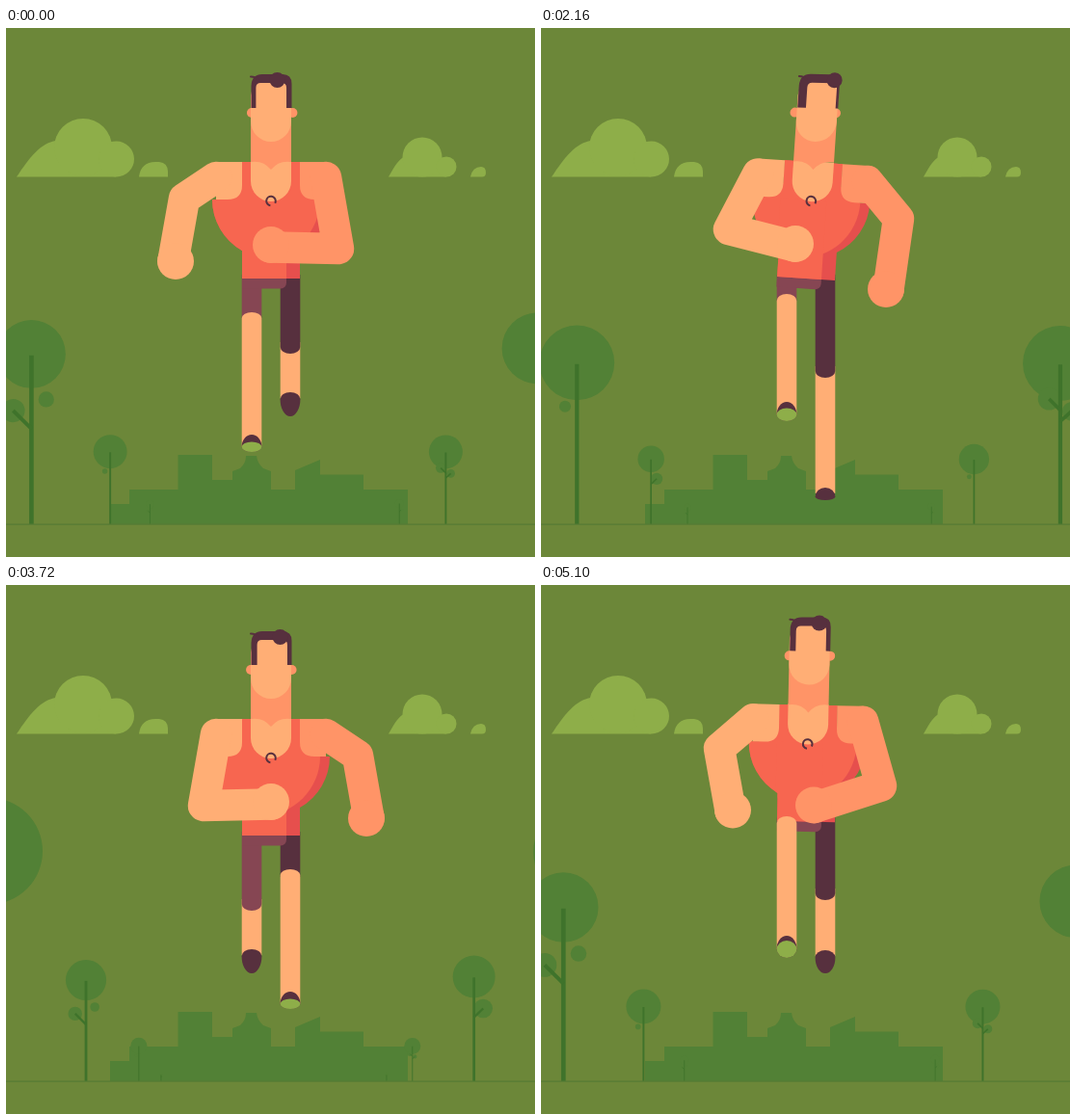
These frames come from a looping animation (549x549 px, 5.13 s). An HTML page with a canvas:

```html
<!DOCTYPE html>
<html lang="en">
<head>
<meta charset="utf-8">
<title>Runner</title>
<style>
html, body { margin: 0; width: 100%; height: 100%; overflow: hidden; background: #6c8739; }
canvas { display: block; width: 100vw; height: 100vh; }
</style>
</head>
<body>
<canvas id="stage" width="549" height="549"></canvas>
<script>
const c = document.getElementById('stage').getContext('2d');
const TAU = Math.PI * 2;
const STEP = 30, STEPS = 171, STRIDE = 19, CYCLE = 20;
const GROUND = 515, MID = 275;

const SKY = '#6c8739', CLOUD = '#8eae49', LEAF = '#528136', TRUNK = '#3f732b';
const SKIN = '#ffae75', TAN = '#ff9467', SHIRT = '#f76650', SHADE = '#e64f4d';
const PLUM = '#864653', DARK = '#57303e';

// Key poses of the right side; the left side is half a cycle later.
const KEYS = [0, 1, 5, 6, 8, 10, 11, 15, 16, 18];
const POSE = {
  elbowX: [70, 59, 80, 86, 90, 90, 93, 96, 92, 78],
  elbowY: [-31, -30, -51, -61, -76, -83, -84, -62, -52, -37],
  handX: [0, 1, 11, 25, 76, 99, 125, 83, 53, 8],
  handY: [-35, -58, -36, -22, -12, -18, -29, 11, 13, -17],
  knee: [338, 363, 276, 233, 240, 295, 372, 363, 342, 327],
  foot: [403, 459, 408, 376.5, 387, 440, 515, 490, 452, 403],
  shoe: [25, 16, 20, 23.5, 23, 18, 11, 13, 16, 24]
};
const TILT = [0, -2.3, -3.8, -3.5, -1.2, 0, 2.3, 3.8, 3.5, 1.2];
const TURN = [6.5, 0.5, 0, 1.5, 6.5, 9.5, 15.5, 16, 14.5, 9.5];
const HIP_KEYS = [0, 1, 2.3, 5, 6, 7, 8];
const HIP = [260, 279, 284, 260, 244.5, 241.5, 245.5];

// Periodic cubic curve, flat at its extremes.
function ring(keys, vals, period, x) {
  const n = keys.length;
  x = ((x % period) + period) % period;
  const key = i => keys[((i % n) + n) % n] + Math.floor(i / n) * period;
  const val = i => vals[((i % n) + n) % n];
  const slope = i => {
    const a = val(i) - val(i - 1), b = val(i + 1) - val(i);
    return a * b <= 0 ? 0 : (a + b) / (key(i + 1) - key(i - 1));
  };
  let i = n - 1;
  while (keys[i] > x) i--;
  const w = key(i + 1) - key(i), s = (x - key(i)) / w, r = 1 - s;
  return r * r * (1 + 2 * s) * val(i) + s * s * (3 - 2 * s) * val(i + 1) +
    w * (s * r * r * slope(i) - s * s * r * slope(i + 1));
}

function disc(x, y, r, color) {
  c.fillStyle = color;
  c.beginPath();
  c.arc(x, y, r, 0, TAU);
  c.fill();
}

function box(x, y, w, h, color, radii = 0) {
  c.fillStyle = color;
  c.beginPath();
  c.roundRect(x, y, w, h, radii);
  c.fill();
}

function line(x1, y1, x2, y2, width, color) {
  c.strokeStyle = color;
  c.lineWidth = width;
  c.lineCap = 'butt';
  c.beginPath();
  c.moveTo(x1, y1);
  c.lineTo(x2, y2);
  c.stroke();
}

function shape(d, color) {
  c.fillStyle = color;
  c.fill(new Path2D(d));
}

/* scenery */

function clouds() {
  shape('M11 154.5C24 135 36 119 52 117L110 118L114 154.5Z', CLOUD);
  disc(80, 124, 30, CLOUD);
  disc(114.5, 136, 18.5, CLOUD);
  shape('M138 154.5Q140 139 155 139H159Q168 140 168 149V154.5Z', CLOUD);
  shape('M397 154.5C403 144 408 135 415 133L452 134L457 154.5Z', CLOUD);
  disc(432, 134, 20.5, CLOUD);
  disc(457, 144, 10.5, CLOUD);
  shape('M482 154.5Q484 144 493 144Q498 144 498 150Q498 154.5 494 154.5Z', CLOUD);
}

function city() {
  shape('M108 515V494H128V479H178.5V443H214V469H235V460L243 457Q249 452 249 444H260' +
    'Q261 452 267 457L275 460V479H300V459L326 448V463.5H371V479H417V515Z', LEAF);
}

// Crown radius and height, then twigs: x, y, radius, height of the joint (0 = no branch).
const BUSHY = { r: 0.302, h: 1.302, twigs: [[-0.096, 0.95, 0.047, 0]] };
const PAIR = { r: 0.254, h: 1.265, twigs: [[-0.136, 0.845, 0.087, 0.71], [0.11, 0.928, 0.058, 0]] };
const SINGLE = { r: 0.265, h: 1.308, twigs: [[0.115, 0.91, 0.118, 0.8]] };
const FORKED = { r: 0.302, h: 1.298, twigs: [[-0.09, 1.01, 0.09, 0.92], [0.09, 0.91, 0.075, 0.83]] };
const LEFT = [BUSHY, SINGLE, PAIR, BUSHY, PAIR];
const RIGHT = [FORKED, BUSHY, SINGLE, FORKED, SINGLE];

function tree(x, s, kind) {
  const top = GROUND - kind.h * s;
  disc(x, top, kind.r * s, LEAF);
  for (const [dx, dy, r] of kind.twigs) disc(x + dx * s, GROUND - dy * s, r * s, LEAF);
  const w = Math.max(0.8, s * 0.033);
  line(x, GROUND, x, top + 0.01 * s, w, TRUNK);
  for (const [dx, dy, , joint] of kind.twigs) {
    if (joint) line(x, GROUND - joint * s, x + dx * s, GROUND - dy * s, w * 0.85, TRUNK);
  }
}

// Five trees on each side shrink away from the viewer, one after the other.
function trees(n) {
  const row = LEFT.map((_, k) => ({ k, age: (k + 0.07 + n * 5 / STEPS) % 5 }));
  row.sort((a, b) => b.age - a.age);
  for (const { k, age } of row) {
    const s = 2.3 * (6 - age) ** 3;
    tree(166 - s, s, LEFT[k]);
    tree(389 + 1.165 * s, s, RIGHT[k]);
  }
}

/* runner */

function sidePose(q) {
  const p = { q: q % CYCLE };
  for (const name in POSE) p[name] = ring(KEYS, POSE[name], CYCLE, q);
  p.front = p.q > 2.5 && p.q < 11.5;
  p.bend = Math.min(7, 5 * Math.abs(p.q - 11.2));
  return p;
}

function shoe(x, p) {
  const rise = p.shoe - 11;
  const low = p.front ? Math.max(0, rise * 0.75) : 1 + rise * 1.2;
  const y = p.foot - low;
  c.fillStyle = DARK;
  c.beginPath();
  c.ellipse(x, y, 10.4, p.shoe - low, 0, Math.PI, TAU);
  c.ellipse(x, y, 10.4, low, 0, 0, Math.PI);
  c.fill();
  if (p.front && low > 0.3) {
    c.fillStyle = CLOUD;
    c.beginPath();
    c.ellipse(x, y, 10.4, low, 0, 0, TAU);
    c.fill();
  }
}

function shin(x, p) {
  const top = p.front ? p.knee : p.knee - 12;
  const end = p.front ? p.foot - Math.max(0, (p.shoe - 11) * 0.75) : p.foot - p.shoe + 6;
  const bend = p.front ? p.bend : 0;
  c.fillStyle = SKIN;
  c.beginPath();
  c.ellipse(x, top + bend, 10.3, bend, 0, Math.PI, TAU);
  c.lineTo(x + 10.3, end);
  c.lineTo(x - 10.3, end);
  c.fill();
  shoe(x, p);
}

function thigh(x, p, hip, color) {
  const top = hip - 4;
  const end = p.front ? p.knee + 8 : p.knee - p.bend;
  if (end <= top) return;
  c.fillStyle = color;
  c.beginPath();
  c.moveTo(x - 10.3, top);
  c.lineTo(x + 10.3, top);
  c.lineTo(x + 10.3, end);
  if (!p.front) c.ellipse(x, end, 10.3, p.bend, 0, 0, Math.PI);
  c.lineTo(x - 10.3, end);
  c.fill();
}

function arm(side, p, hip, tilt, color) {
  const cos = Math.cos(tilt), sin = Math.sin(tilt), sx = 57 * side, sy = -105;
  const elbow = { x: MID + side * p.elbowX, y: hip + p.elbowY };
  const hand = { x: MID + side * p.handX, y: hip + p.handY };
  const dx = hand.x - elbow.x, dy = hand.y - elbow.y, len = Math.hypot(dx, dy);

  c.save();
  c.translate(MID, hip);
  c.rotate(tilt);
  c.scale(side, 1);
  shape('M30 -121H57V-82H45Q30 -82 30 -97Z', color);
  c.restore();

  // The wrist sits off the hand's centre so that the outer edges meet.
  c.strokeStyle = color;
  c.lineWidth = 32.5;
  c.lineCap = c.lineJoin = 'round';
  c.beginPath();
  c.moveTo(MID + sx * cos - sy * sin, hip + sx * sin + sy * cos);
  c.lineTo(elbow.x, elbow.y);
  c.lineTo(hand.x + side * dy / len * 2.5, hand.y - side * dx / len * 2.5);
  c.stroke();
  disc(hand.x, hand.y, 19, color);
}

const VEST = new Path2D('M-30 -121H30V-97H50V-82H61A61 61 0 0 1 30 -29V0H-30V-29' +
  'A61 61 0 0 1 -61 -82H-50V-97H-30Z');

function torso() {
  c.save();
  c.clip(VEST);
  box(-70, -125, 140, 130, SHADE);
  box(-70, -125, 119, 44, SHIRT);
  disc(-10, -82, 61, SHIRT);
  box(-32, -82, 48, 90, SHIRT);
  c.restore();
  shape('M-21 -122H21V-101A21 21 0 0 1 -21 -101Z', SKIN);
  c.strokeStyle = DARK;
  c.lineWidth = 2;
  c.lineCap = 'butt';
  c.beginPath();
  c.arc(0, -80.5, 4.8, 1.7, TAU + 0.5);
  c.stroke();
}

function head(turn) {
  const w = turn - 8;
  shape('M-21 -170H21V-121Q8 -123 0 -113Q-8 -123 -21 -121Z', TAN);
  disc(-20.5 - w * 0.3, -172, 5, TAN);
  disc(22 - w * 0.3, -172, 5, TAN);
  shape('M-17 -207H18L21 -190V-163A21 21 0 0 1 -21 -163V-190Z', SKIN);

  const l = -15 + w * 0.4, r = 16.5 + w * 0.3;
  shape('M-20.5 -177V-200Q-20 -212 -9 -212H12Q21.5 -212 21.5 -202V-177H' + r +
    'V-198Q' + r + ' -203 ' + (r - 5) + ' -203H' + (l + 5) +
    'Q' + l + ' -203 ' + l + ' -198V-177Z', DARK);
  disc(turn, -206, 8, DARK);
  c.strokeStyle = DARK;
  c.lineWidth = 2;
  c.lineCap = 'round';
  c.beginPath();
  c.moveTo(-21, -209.5);
  c.quadraticCurveTo(-16, -209.5, -13, -206);
  c.stroke();
}

function runner(q) {
  const hip = ring(HIP_KEYS, HIP, CYCLE / 2, q);
  const tilt = ring(KEYS, TILT, CYCLE, q) * Math.PI / 180;
  const right = sidePose(q), left = sidePose(q + CYCLE / 2);
  const legs = [[255, left, PLUM], [295, right, DARK]];

  for (const [x, p, color] of legs) {
    if (!p.front) shin(x, p);
    thigh(x, p, hip, color);
  }

  c.save();
  c.translate(MID, hip);
  c.save();
  c.rotate(tilt);
  box(-30, -2, 46, 12.5, PLUM, [0, 0, 6, 0]);
  torso();
  c.restore();
  // The head leans with the body but stays almost level.
  c.transform(1, tilt * 0.3, -tilt, 1, 0, 0);
  head(ring(KEYS, TURN, CYCLE, q));
  c.restore();

  arm(-1, left, hip, tilt, SKIN);
  arm(1, right, hip, tilt, TAN);
  for (const [x, p] of legs) if (p.front) shin(x, p);
}

function draw(now) {
  const n = Math.floor(now / STEP + 0.01) % STEPS;
  c.fillStyle = SKY;
  c.fillRect(0, 0, 549, 549);
  clouds();
  city();
  trees(n);
  box(0, GROUND - 0.5, 549, 1.2, '#567b34');
  runner(n % STRIDE);
}

let start = null;
function tick(now) {
  if (start === null) start = now;
  draw(now - start);
  requestAnimationFrame(tick);
}
draw(0);
requestAnimationFrame(tick);
</script>
</body>
</html>
```
